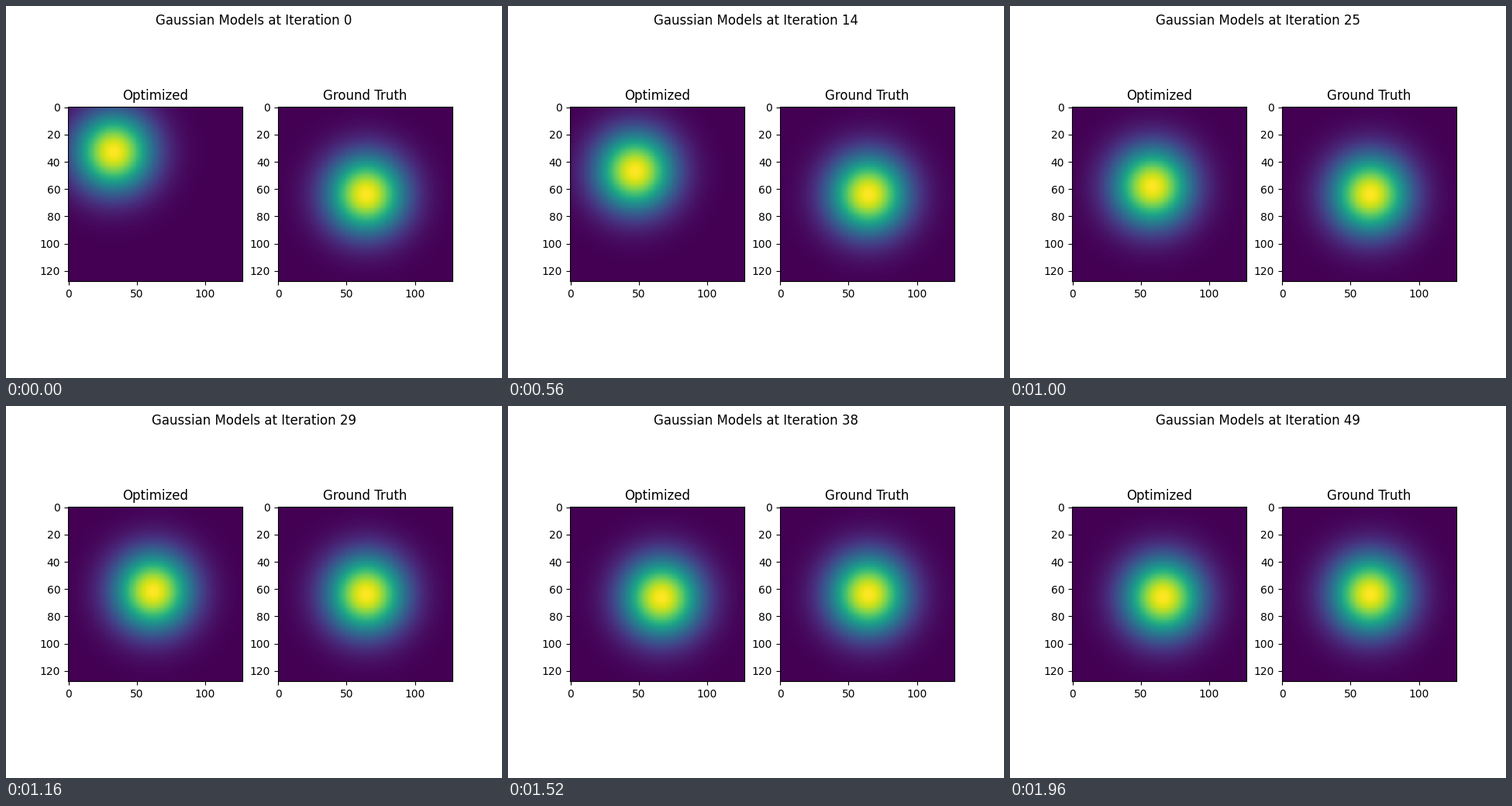
A matplotlib script that plays this animation: 640 by 480 pixels, repeating every 2 s.

```python
import numpy as np
import matplotlib.pyplot as plt
from matplotlib.animation import FuncAnimation

SIZE = 128
SIGMA = 20
TRUE_MEAN = 64
STEPS = 50

# The mean climbs at a steady rate, overshoots the true mean and drifts back.
KEY_STEPS = np.array([0, 7, 14, 25, 34, 42, 49])
KEY_MEANS = np.array([33, 40, 47.1, 58.3, 65.1, 66.9, 66.1])
SLOPES = np.gradient(KEY_MEANS, KEY_STEPS)


def mean_at(step):
    """Cubic Hermite curve through the key means."""
    k = min(np.searchsorted(KEY_STEPS, step, side="right") - 1, len(KEY_STEPS) - 2)
    span = KEY_STEPS[k + 1] - KEY_STEPS[k]
    u = (step - KEY_STEPS[k]) / span
    ease = u * u * (3 - 2 * u)
    return (KEY_MEANS[k] * (1 - ease) + KEY_MEANS[k + 1] * ease
            + span * u * (1 - u) * (SLOPES[k] * (1 - u) - SLOPES[k + 1] * u))


def gaussian(mean):
    g = np.exp(-(np.arange(SIZE) - mean) ** 2 / (2 * SIGMA ** 2))
    return np.outer(g, g)


def show(ax, title, mean):
    ax.set_title(title)
    return ax.imshow(gaussian(mean), cmap="viridis", vmin=0, vmax=1,
                     interpolation="nearest")


plt.rcParams["font.family"] = "DejaVu Sans"
fig, (left, right) = plt.subplots(1, 2, figsize=(6.4, 4.8), dpi=100)
heading = fig.suptitle("")
model = show(left, "Optimized", mean_at(0))
show(right, "Ground Truth", TRUE_MEAN)


def update(step):
    model.set_data(gaussian(mean_at(step)))
    heading.set_text(f"Gaussian Models at Iteration {step}")
    return model, heading


anim = FuncAnimation(fig, update, frames=STEPS, interval=40, repeat=True,
                     repeat_delay=0, blit=False)
plt.show()
```
